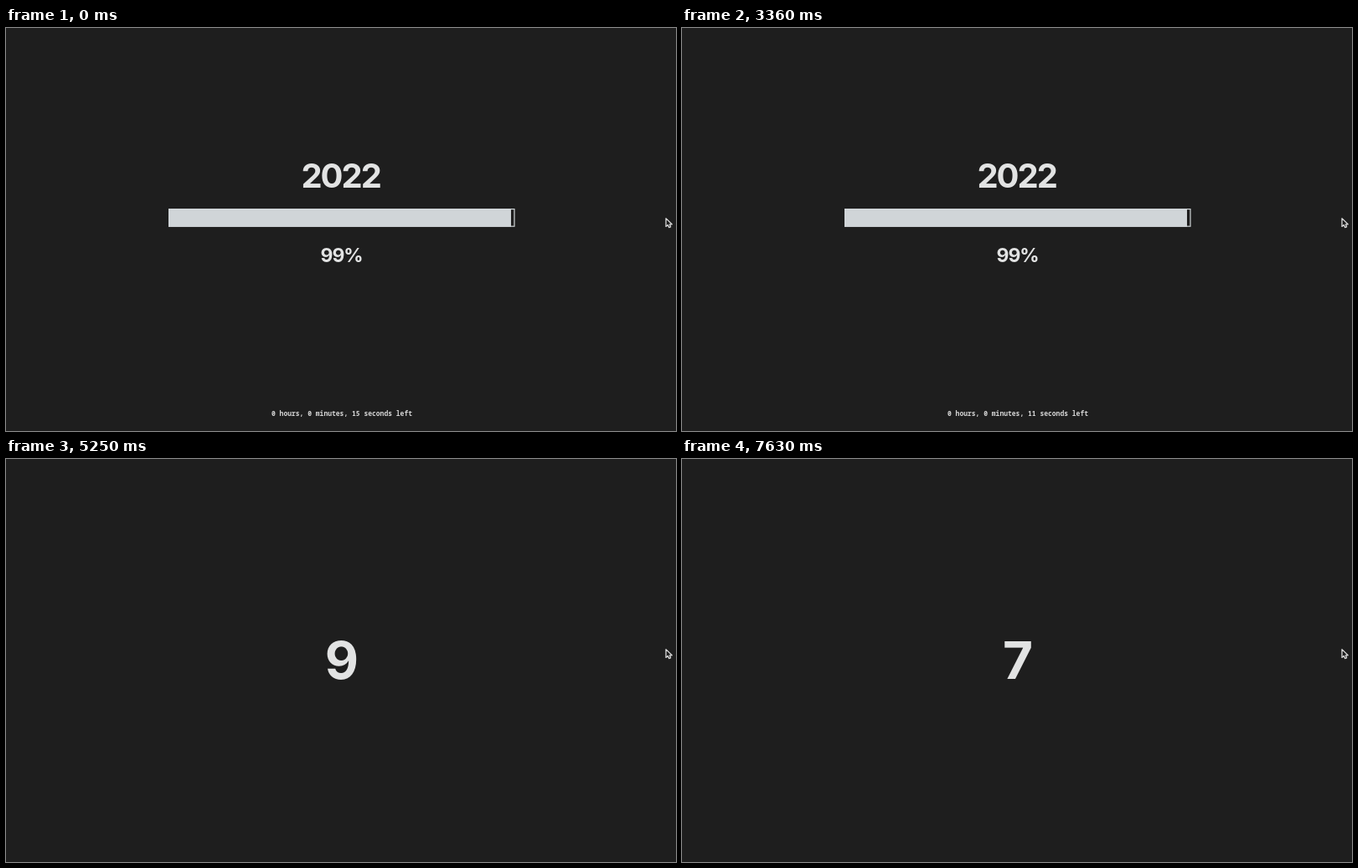
An HTML page for the animation above (8000 ms loop, 800x482 px).

```html
<!DOCTYPE html>
<html lang="en">
<head>
<meta charset="utf-8">
<title>Year countdown</title>
<style>
  html, body { margin: 0; width: 100%; height: 100%; overflow: hidden; background: #1e1e1e; }
  svg { display: block; width: 100%; height: 100%; }
  text { fill: #e2e3e3; text-anchor: middle; font-family: Inter, "Liberation Sans", sans-serif; font-weight: 700; }
  .year { font-size: 40px; letter-spacing: -0.05em; }
  .percent { font-size: 23px; letter-spacing: -0.05em; }
  .left { font-size: 8px; font-family: "Noto Sans Mono", "DejaVu Sans Mono", monospace; fill: #d6d6d6; }
  .final { font-size: 62px; }
  .frame { fill: none; stroke: #d0d5d8; stroke-width: 1.2; }
  .fill { fill: #d0d5d8; }
  .cursor { fill: #1e1e1e; stroke: #d8d8d8; stroke-width: 1.3; stroke-linejoin: round; }
  [hidden] { display: none; }
</style>
</head>
<body>
<svg viewBox="0 0 800 482">
  <g id="progress">
    <text class="year" x="399.7" y="191">2022</text>
    <rect class="frame" x="194.6" y="216.6" width="412.4" height="20.6"/>
    <rect class="fill" x="194" y="216" width="409" height="21.8"/>
    <text class="percent" x="400.5" y="279.5">99%</text>
    <text class="left" id="left" x="401" y="463.5"></text>
  </g>
  <text class="final" id="final" x="401" y="263.3"></text>
  <path class="cursor" d="M788 227.6V237.4L790.3 235.4L791.6 238.6L793.6 237.8L792.4 234.8H795.2Z"/>
</svg>
<script>
  const LOOP = 8000;
  const START = 15;
  const ticks = [70, 1050, 2100, 3150, 4270, 5250, 6300, 7350];
  const [progress, left, final] = ["progress", "left", "final"].map(id => document.getElementById(id));
  let shown;

  function show(seconds) {
    if (seconds === shown) return;
    shown = seconds;
    const closing = seconds <= 10;
    progress.toggleAttribute("hidden", closing);
    final.toggleAttribute("hidden", !closing);
    left.textContent = `0 hours, 0 minutes, ${seconds} seconds left`;
    final.textContent = seconds;
  }

  const origin = performance.now();
  function draw() {
    const time = (performance.now() - origin) % LOOP;
    show(START - ticks.filter(tick => tick <= time).length);
    requestAnimationFrame(draw);
  }
  draw();
</script>
</body>
</html>
```
